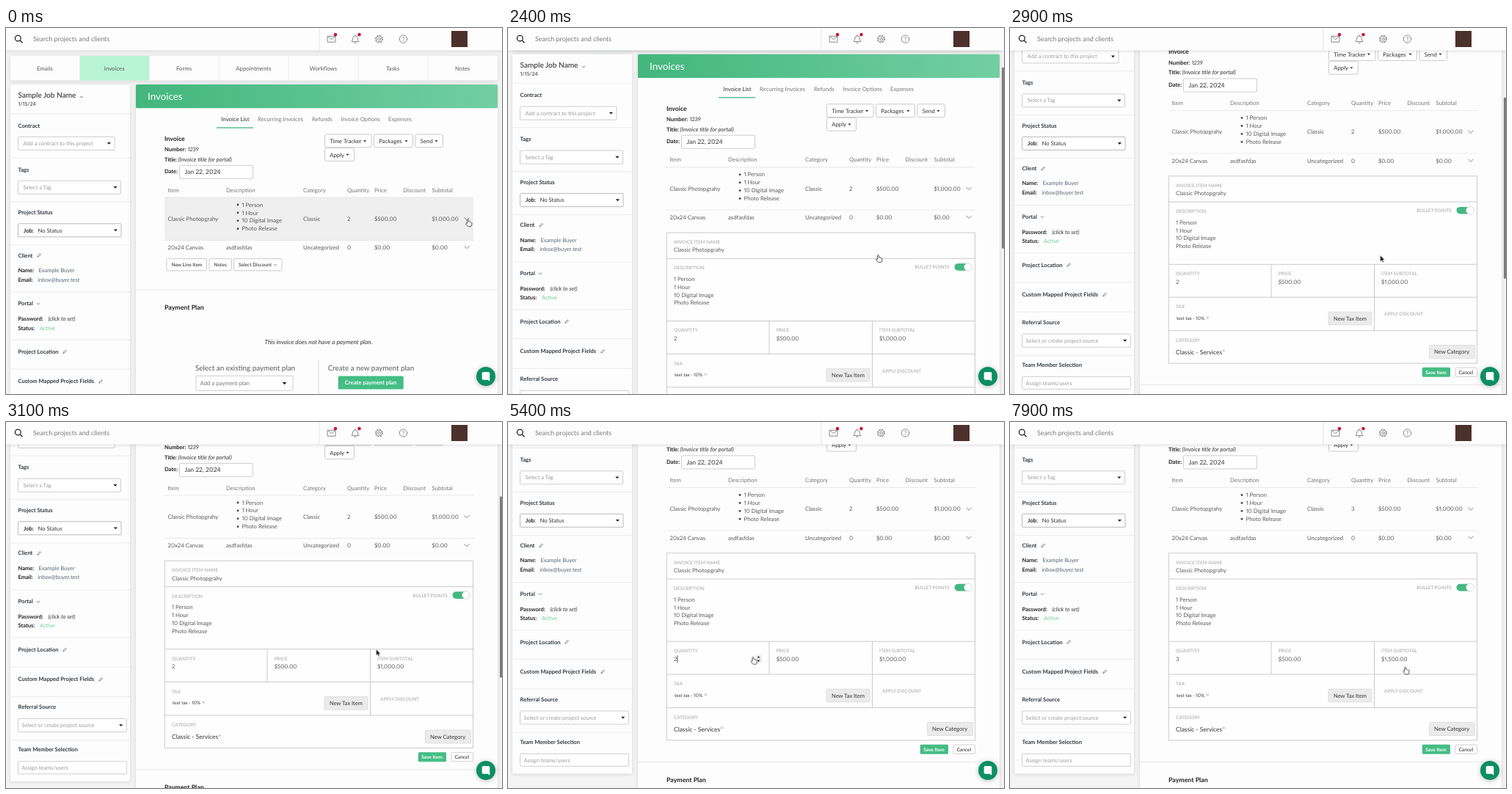
An HTML page that plays this animation: 676x499 px, repeating every 8 s.

```html
<!DOCTYPE html>
<html lang="en">
<head>
<meta charset="utf-8">
<title>Invoices</title>
<style>
@property --scroll { syntax: '<number>'; inherits: true; initial-value: 0; }
@property --open { syntax: '<number>'; inherits: true; initial-value: 0; }
html, body { margin: 0; width: 100%; height: 100%; overflow: hidden; background: #f4f4f4; }
svg {
  display: block; width: 676px; height: 499px;
  font-family: Lato, 'Open Sans', sans-serif;
  font-variant-numeric: proportional-nums;
  text-rendering: geometricPrecision;
  animation: scroll 8s linear infinite, open 8s linear infinite;
}
text { fill: #5a5a5a; }
.b { font-weight: 700; fill: #303a40; }
.k { font-weight: 700; fill: #222; }
.m { font-weight: 500; fill: #333; }
.d { fill: #333; }
.i { font-style: italic; fill: #333; }
.g { fill: #9a9a9a; }
.h { fill: #777; }
.v { fill: #566573; }
.l { font-weight: 700; fill: #b9b9b9; }
.w { fill: #fff; }
.wb { fill: #fff; font-weight: 700; }
.ok { fill: #6fcf97; }
.mid { text-anchor: middle; }
.card { fill: #fdfdfd; filter: drop-shadow(0 1px 2.5px #0002); }
.icon { fill: none; stroke: #85898d; stroke-width: 1; stroke-linejoin: round; stroke-linecap: round; }

.page { transform: translateY(calc(var(--scroll) * -1px)); }
.cover { transform: translateY(calc(var(--open) * 290px)); }
.below { transform: translateY(calc(var(--open) * 248px)); }
.thumb { transform: translateY(calc(var(--scroll) * .53px)); }
.bar { animation: bar 8s linear infinite; }
.hover { animation: hover 8s step-end infinite; }
.actions { animation: actions 8s step-end infinite; }
.before { animation: before 8s step-end infinite; }
.after { animation: after 8s step-end infinite; }
.caret { animation: caret 8s step-end infinite; }
.spin { animation: spin 8s step-end infinite; }
.arrow { animation: arrow 8s step-end infinite; }
.hand { animation: hand 8s step-end infinite; transform: scale(.9); }
.cursor { animation: cursor 8s ease-in-out infinite; }

@keyframes scroll {
  0%, 26.25% { --scroll: 0; }
  28.75% { --scroll: 18; }
  30.6% { --scroll: 52; }
  32.5% { --scroll: 84.5; }
  35% { --scroll: 112; }
  38.75% { --scroll: 131; }
  40%, 43.75% { --scroll: 132; }
  46.25% { --scroll: 136; }
  50% { --scroll: 139.6; }
  53.75%, to { --scroll: 141.5; }
}
@keyframes open { 0%, 12.4% { --open: 0; } 17%, to { --open: 1; } }
@keyframes bar { 0%, 26% { opacity: 0; } 27%, 58% { opacity: 1; } 61%, to { opacity: 0; } }
@keyframes hover { 0% { opacity: 1; } 25.8%, to { opacity: 0; } }
@keyframes actions { 0% { opacity: 1; } 12.5%, to { opacity: 0; } }
@keyframes before { 0% { opacity: 1; } 73.75%, to { opacity: 0; } }
@keyframes after { 0% { opacity: 0; } 73.75%, to { opacity: 1; } }
@keyframes caret { 0% { opacity: 0; } 65% { opacity: 1; } 92.5%, to { opacity: 0; } }
@keyframes spin { 0% { opacity: 0; } 62.5% { opacity: 1; } 92%, to { opacity: 0; } }
@keyframes arrow { 0% { opacity: 0; } 35% { opacity: 1; } 43.75%, to { opacity: 0; } }
@keyframes hand { 0% { opacity: 1; } 35% { opacity: 0; } 43.75%, to { opacity: 1; } }
@keyframes cursor {
  0%, 15% { transform: translate(629.5px, 261px); }
  20%, 22.5% { transform: translate(596.5px, 237px); }
  28%, 43.75% { transform: translate(504.5px, 309.7px); }
  49%, 55% { transform: translate(499px, 337.7px); }
  65%, 91.25% { transform: translate(334px, 320.5px); }
  93.75%, 97.5% { transform: translate(397px, 318px); }
  98.7%, to { transform: translate(538.7px, 334.3px); }
}
</style>
</head>
<body>
<script>
const text = (x, y, s, cls = '', size = 7.75) =>
  `<text x="${x}" y="${y}" font-size="${size}" class="${cls}">${s}</text>`;
const rect = (x, y, w, h, fill, more = '') =>
  `<rect x="${x}" y="${y}" width="${w}" height="${h}" fill="${fill}" ${more}/>`;
const box = (x, y, w, h, stroke = '#c9c9c9', fill = '#fff', rx = 1) =>
  rect(x, y, w, h, fill, `stroke="${stroke}" stroke-width=".9" rx="${rx}"`);
const line = (x1, y1, x2, y2, color = '#e6e6e6') =>
  `<path d="M${x1} ${y1}L${x2} ${y2}" stroke="${color}" stroke-width=".9"/>`;
const tri = (x, y, r = 2.6, color = '#222') =>
  `<path d="M${x - r} ${y - r / 2}h${2 * r}l${-r} ${r * 1.1}z" fill="${color}"/>`;
const chevron = (x, y, r = 3.5, color = '#777') =>
  `<path d="M${x - r} ${y - r / 2}l${r} ${r}l${r} ${-r}" fill="none" stroke="${color}" stroke-width=".9"/>`;
const pencil = (x, y) =>
  `<path d="M${x - 2.2} ${y + 2.2}l.5-1.7 2.9-2.9 1.2 1.2-2.9 2.9z" fill="#fff" stroke="#555" stroke-width=".7"/>`;
const cross = (x, y) =>
  `<path d="M${x - 1.6} ${y - 1.6}l3.2 3.2m0-3.2l-3.2 3.2" stroke="#999" stroke-width=".7"/>`;
const group = (cls, ...parts) => `<g class="${cls}">${parts.flat().join('')}</g>`;
const select = (x, y, w, s, stroke = '#c9c9c9', pad = 7) =>
  box(x, y, w, 18, stroke) + text(x + pad, y + 11.6, s, 'g', 7.45) + tri(x + w - 7.6, y + 9);
const menu = (x, y, w, s) =>
  box(x, y, w, 17.8, '#c4c4c4', '#fff', 2) + text(x + 6.8, y + 12, s, 'd') + tri(x + w - 9, y + 9.2, 2);
const button = (x, y, w, h, s, size = 6.55) =>
  box(x, y, w, h, '#c4c4c4', '#fff', 1.5) + text(x + 6.5, y + h / 2 + 2.4, s, 'm', size);

const navTabs = [
  rect(6, 38, 664, 33.5, '#fdfdfd', 'class="card" rx="2"'),
  rect(100.5, 38, 95, 33.5, '#b9f5d5'),
  ['Emails', 'Invoices', 'Forms', 'Appointments', 'Workflows', 'Tasks', 'Notes'].map((s, i) =>
    text(52.8 + i * 94.9, 57.5, s, 'mid', 7.8) + (i ? line(5.7 + i * 94.9, 38, 5.7 + i * 94.9, 71.5, '#ececec') : '')),
];

const sidebar = [
  rect(6, 77, 163, 544, '', 'class="card" rx="2"'),
  [117, 177, 237, 296, 360, 425, 465, 505.5, 565].map(y => line(6, y, 169, y, '#ebebeb')),
  text(16.5, 95, 'Sample Job Name', 'm', 10.1), chevron(103, 94, 2.2),
  text(16.5, 106, '1/15/24', 'd', 7.2),
  [['Contract', 135.5], ['Tags', 195.5], ['Project Status', 254], ['Client', 312.5], ['Portal', 378],
   ['Project Location', 444], ['Custom Mapped Project Fields', 484], ['Referral Source', 522.5],
   ['Team Member Selection', 580.5]].map(([s, y]) => text(16.5, y, s, 'b', 7.6)),
  select(16.5, 148.3, 131.5, 'Add a contract to this project'),
  select(16.5, 208.3, 140, 'Select a Tag'),
  select(16.5, 266.8, 140.5, '', '#b4b4b4'),
  text(24, 278.7, 'Job:', 'k', 7.6), text(43.5, 278.7, 'No Status', 'd', 7.7),
  pencil(45, 310), chevron(44, 376, 2.2), pencil(80, 441.5), pencil(129, 482),
  text(16.5, 332.8, 'Name:', 'k', 7.5), text(44.5, 332.8, 'Example Buyer', 'v', 7.5),
  text(16.5, 345.5, 'Email:', 'k', 7.5), text(43.3, 345.5, 'inbox@buyer.test', 'v', 7.5),
  text(16.5, 399, 'Password:', 'k', 7.5), text(57.5, 399, '(click to set)', 'i', 7.6),
  text(16.5, 411.5, 'Status:', 'k', 7.5), text(46, 411.5, 'Active', 'ok', 7.5),
  select(16.5, 535.5, 147.8, 'Select or create project source', '#c9c9c9', 5),
  box(16.5, 593.8, 147.8, 17), text(21.5, 605.2, 'Assign teams/users', 'g', 7.45),
];

const invoiceHead = [
  rect(177, 77, 493, 900, '', 'class="card" rx="2"'),
  rect(177, 77, 493, 32.3, 'url(#green)', 'rx="1.5"'),
  text(193, 98, 'Invoices', 'w', 13.4),
  text(293.3, 126.8, 'Invoice List', 'd'),
  [[343, 'Recurring Invoices'], [417, 'Refunds'], [456.5, 'Invoice Options'], [521, 'Expenses']]
    .map(([x, s]) => text(x, 126.8, s, 'h')),
  rect(287, 135.3, 50, 1.4, '#4dbd88'),
  text(216, 153.8, 'Invoice', 'k', 8.7),
  text(216, 168, 'Number:', 'k', 7.5), text(247.8, 168, '1239', 'i', 7.6),
  text(216, 181.8, 'Title:', 'k', 7.5), text(234.6, 181.8, '(Invoice title for portal)', 'i', 7.8),
  text(216, 198.3, 'Date:', 'k', 7.5),
  box(236.5, 187.4, 100, 18), text(243.5, 199.4, 'Jan 22, 2024', 'd', 8.6),
  menu(434.5, 145, 63.5, 'Time Tracker'), menu(501.5, 145, 53, 'Packages'),
  menu(558, 145, 37.5, 'Send'), menu(434.5, 163.6, 40, 'Apply'),
];

const cols = [220.5, 300, 405, 465, 502, 541.5, 580.5];
const row = (y, cells, cls) => cells.map((s, i) => s ? text(cols[i], y, s, cls) : '');
const perks = ['1 Person', '1 Hour', '10 Digital Image', 'Photo Release'];
const table = [
  row(223.6, ['Item', 'Description', 'Category', 'Quantity', 'Price', 'Discount', 'Subtotal'], 'h'),
  rect(216, 231, 421, 58.5, '#efefef', 'class="hover"'),
  line(216, 231, 637, 231), line(216, 289.5, 637, 289.5),
  row(262.8, ['Classic Photopgrahy', '', 'Classic', '', '$500.00', '', '$1,000.00']),
  text(465, 262.8, '2', 'before'), text(465, 262.8, '3', 'after'),
  perks.map((s, i) => `<circle cx="316" cy="${241 + i * 10.9}" r="1.4" fill="#444"/>` + text(321.5, 243.6 + i * 10.9, s)),
  row(302, ['20x24 Canvas', 'asdfasfdas', 'Uncategorized', '0', '$0.00', '', '$0.00']),
  chevron(628, 260), chevron(628, 299),
];

const edge = '#c6c6c6';
const label = (x, y, s) => text(x, y, s, 'l', 6.35);
const panel = [
  rect(216.3, 320.3, 420.2, 255.2, '#fefefe', `stroke="${edge}" stroke-width=".9"`),
  [355.5, 440.7, 485.5, 531].map(y => line(216, y, 636.5, y, edge)),
  line(356, 440.7, 356, 485.5, edge), line(496.5, 440.7, 496.5, 531, edge),
  label(226, 335.4, 'INVOICE ITEM NAME'), text(226, 346.6, 'Classic Photopgrahy'),
  label(226, 370.6, 'DESCRIPTION'), label(554.3, 369.6, 'BULLET POINTS'),
  rect(608.5, 362.3, 23.5, 9.6, '#43b883', 'rx="4.8"'),
  '<circle cx="627" cy="367" r="5.4" fill="#fff" stroke="#c4c4c4" stroke-width=".6"/>',
  perks.map((s, i) => text(226, 386.2 + i * 10.8, s)),
  label(226, 455.7, 'QUANTITY'), label(365.7, 455.7, 'PRICE'), label(506, 455.7, 'ITEM SUBTOTAL'),
  text(226, 467.2, '2', 'before'), text(226, 467.2, '3', 'after'),
  text(365.7, 467.2, '$500.00'),
  text(506, 467.2, '$1,000.00', 'before'), text(506, 467.2, '$1,500.00', 'after'),
  rect(230.5, 459.5, .8, 10, '#222', 'class="caret"'),
  group('spin', rect(337, 459.3, 9, 10.4, '#ececec'), tri(341.5, 467, 2),
    '<path d="M339.5 463l2-2.2 2 2.2z" fill="#222"/>'),
  label(226, 500.8, 'TAX'), text(227, 516.5, 'test tax - 10%', 'd', 6.3), cross(269.3, 513.3),
  box(434, 505.6, 59, 17.6, '#ddd', '#ebebeb'), text(441, 517, 'New Tax Item', 'd', 7.55),
  label(510, 510.8, 'APPLY DISCOUNT'),
  label(226, 546.4, 'CATEGORY'), text(226, 563.4, 'Classic - Services', 'd', 8.45), cross(291.3, 558.5),
  box(571.5, 551, 62, 18, '#ddd', '#ebebeb'), text(578, 562.8, 'New Category', 'd', 7.65),
  rect(561.8, 581.2, 38.2, 13, '#45bd85', 'rx="1.5"'), text(566.2, 590, 'Save Item', 'wb', 6.55),
  box(607, 581.6, 29.6, 12.2, '#ccc', '#fff', 1.5), text(611.4, 590, 'Cancel', 'm', 6.7),
];

const paymentPlan = [
  line(177, 357, 670, 357),
  text(216, 384.4, 'Payment Plan', 'k', 8.8),
  text(426, 430.6, 'This invoice does not have a payment plan.', 'i mid', 8.3),
  line(426, 452, 426, 510, '#d5d5d5'),
  text(258, 466.8, 'Select an existing payment plan', '', 9.87),
  box(259, 474.3, 132, 20), text(264.5, 487, 'Add a payment plan', 'h'), tri(379.5, 484.5, 3),
  text(438.7, 466.8, 'Create a new payment plan', '', 9.83),
  rect(452.7, 474.4, 89, 18, '#45bd85', 'rx="1.5"'), text(497, 486, 'Create payment plan', 'wb mid', 7.65),
];

const actions = group('actions',
  button(219, 314.6, 54.5, 16.2, 'New Line Item'), button(277, 314.6, 30.5, 16.2, 'Notes'),
  button(310.5, 314.6, 65.5, 16.2, 'Select Discount'), chevron(367, 323, 1.8));

const topBar = [
  rect(0, 0, 676, 30.5, '', 'class="card"'),
  '<g fill="none" stroke="#222" stroke-width="1.3"><circle cx="16.3" cy="14" r="3.9"/><path d="M19.2 17l3.3 3.3"/></g>',
  text(37, 18.2, 'Search projects and clients', 'h', 8.95),
  line(427, 0, 427, 30, '#e4e4e4'),
  group('icon',
    '<path d="M438.5 11.2h10.5v8h-10.5zl5.2 4.5 5.300-4.500"/>',
    '<path d="M471.3 18.300q1.500-1.300 1.500-4.300a3.200 3.200 0 0 1 6.400 0q0 3 1.500 4.300zM474.800 20.300h2.400M476 10.600v-1"/>',
    '<circle cx="508.5" cy="15" r="1.8"/><circle cx="508.5" cy="15" r="4.1"/>',
    '<circle cx="508.5" cy="15" r="4.9" stroke-width="1.2" stroke-linecap="butt" stroke-dasharray="1.92 1.928"/>',
    '<circle cx="541.5" cy="15" r="5.2"/>'),
  text(541.5, 17.8, '?', 'h mid', 8),
  '<g fill="#d3122c"><circle cx="449" cy="9" r="2.3"/><circle cx="481.5" cy="9" r="2.3"/></g>',
  rect(607, 4, 22, 22, '#4c302b'),
];

const chat = '<circle cx="654" cy="475" r="13" fill="#0b8f62" style="filter:drop-shadow(0 1px 3px #0004)"/>' +
  '<path d="M650.5 469h7q1.800 0 1.800 1.800v10.800l-3-1.800h-5.800q-1.800 0-1.800-1.800v-7.200q0-1.800 1.800-1.800z" fill="#fff"/>';

const cursor = group('cursor',
  `<path class="hand" d="M-1.1 6V1a1.1 1.1 0 0 1 2.2 0V3.4q1.5-.4 1.8.6 1.4-.4 1.7.6 1.4-.2 1.4 1V8Q6 10.8 3 10.8H1.4Q-.4 10.8-1.6 8.8L-3.2 6.4q.4-1.2 2.1-.4z"
    fill="#fff" stroke="#222" stroke-width=".9"/>`,
  '<path class="arrow" d="M0 0v8.8l2-1.8 1.3 3 1.5-.7-1.3-2.9h2.7z" fill="#111" stroke="#fff" stroke-width=".6"/>');

document.body.innerHTML = `<svg viewBox="0 0 676 499">
  <defs><linearGradient id="green"><stop stop-color="#43b67d"/><stop offset="1" stop-color="#72cfa2"/></linearGradient></defs>
  ${rect(0, 0, 676, 499, '#f4f4f4')}
  ${group('page', navTabs, sidebar, invoiceHead, table, panel,
    rect(200, 311, 460, 420, '#fdfdfd', 'class="cover"'), actions, group('below', paymentPlan))}
  ${topBar.join('')}
  ${group('bar', rect(673, 32, 3, 247, '#7d7d7d', 'class="thumb" rx="1"'))}
  ${chat}${cursor}
</svg>`;
</script>
</body>
</html>
```
